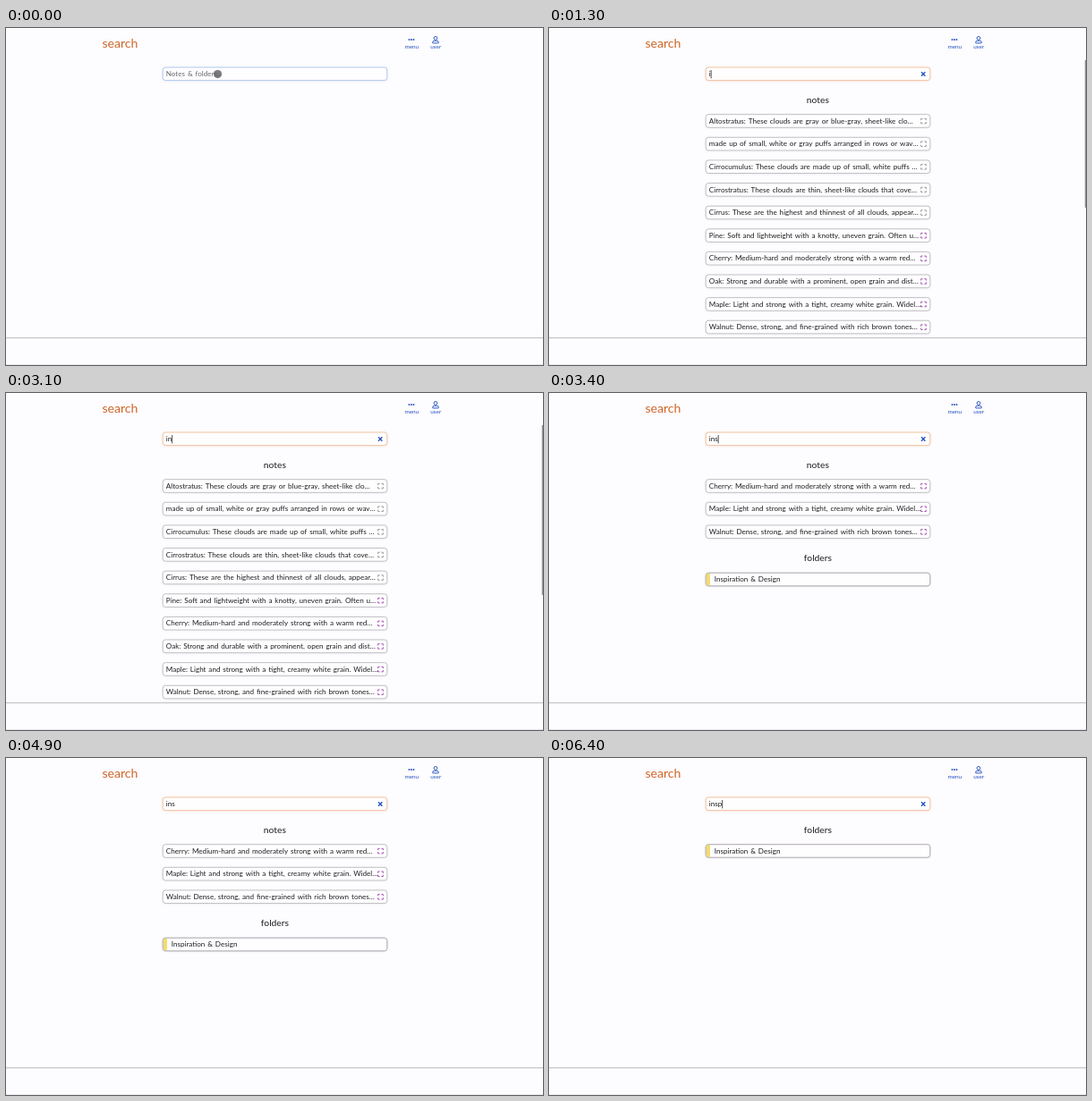
An HTML page with a canvas that plays this animation: 600x377 px, repeating every 6.6 s.

```html
<!DOCTYPE html>
<html lang="en">
<head>
<meta charset="utf-8">
<title>Note search</title>
<style>
  html, body { margin: 0; width: 100%; height: 100%; overflow: hidden; background: #fdfcff; }
  canvas { display: block; width: 600px; height: 377px; }
</style>
</head>
<body>
<canvas id="stage"></canvas>
<script>
const W = 600, H = 377, LOOP = 6600, BLINK = 500;
const FONT = 'Lato, "Open Sans", sans-serif';
const BLUE = '#2453bd', ORANGE = '#cf6526', GREY = '#929196', PURPLE = '#a04aae';
const LEFT = 175.2, WIDTH = 250.6, ROW_GAP = 25.62;

const canvas = document.getElementById('stage');
const ctx = canvas.getContext('2d');
const ratio = window.devicePixelRatio || 1;
canvas.width = W * ratio;
canvas.height = H * ratio;

const clouds = [
  'Altostratus: These clouds are gray or blue-gray, sheet-like clo…',
  'made up of small, white or gray puffs arranged in rows or wav…',
  'Cirrocumulus: These clouds are made up of small, white puffs …',
  'Cirrostratus: These clouds are thin, sheet-like clouds that cove…',
  'Cirrus: These are the highest and thinnest of all clouds, appear…'
].map(text => ({ text, color: GREY }));
const [pine, cherry, oak, maple, walnut] = [
  'Pine: Soft and lightweight with a knotty, uneven grain. Often u…',
  'Cherry: Medium-hard and moderately strong with a warm red…',
  'Oak: Strong and durable with a prominent, open grain and dist…',
  'Maple: Light and strong with a tight, creamy white grain. Widel…',
  'Walnut: Dense, strong, and fine-grained with rich brown tones…'
].map(text => ({ text, color: PURPLE }));
const all = [...clouds, pine, cherry, oak, maple, walnut];
const folders = ['Inspiration & Design'];

// Each state begins with a key press, which also restarts the caret blink.
const states = [
  { at: 0, query: '', idle: true },
  { at: 200, query: '' },
  { at: 1300, query: 'i', notes: all, scroll: 201 },
  { at: 2100, query: 'in', notes: all, scroll: 226 },
  { at: 3400, query: 'ins', notes: [cherry, maple, walnut], folders },
  { at: 5100, query: 'insp', folders }
];

function label(text, x, y, size = 8.1, color = '#1d1c20', align = 'left') {
  ctx.font = `${size}px ${FONT}`;
  ctx.wordSpacing = size < 9 ? '0.8px' : '0px';
  ctx.textAlign = align;
  ctx.fillStyle = color;
  ctx.fillText(text, x, y);
}

function line(points, color, width) {
  ctx.beginPath();
  points.forEach(([x, y], i) => i ? ctx.lineTo(x, y) : ctx.moveTo(x, y));
  ctx.strokeStyle = color;
  ctx.lineWidth = width;
  ctx.stroke();
}

function disc(x, y, r, color) {
  ctx.beginPath();
  ctx.arc(x, y, r, 0, Math.PI * 2);
  ctx.fillStyle = color;
  ctx.fill();
}

function box(cy, border, glow) {
  ctx.beginPath();
  ctx.roundRect(LEFT, cy - 7.3, WIDTH, 14.6, 3);
  ctx.save();
  ctx.shadowColor = glow;
  ctx.shadowBlur = 3 * ratio;
  ctx.shadowOffsetY = 0.5 * ratio;
  ctx.fillStyle = '#fffeff';
  ctx.fill();
  ctx.restore();
  ctx.strokeStyle = border;
  ctx.lineWidth = 0.9;
  ctx.stroke();
}

function expandIcon(x, y, color) {
  for (const sx of [-1, 1]) for (const sy of [-1, 1]) {
    const px = x + sx * 2.8, py = y + sy * 2.8;
    line([[px - sx * 1.9, py], [px, py], [px, py - sy * 1.9]], color, 0.95);
  }
}

function header() {
  label('search', 107.4, 21.5, 14.1, ORANGE);
  for (const dx of [-2.5, 0, 2.5]) disc(453 + dx, 13, 0.95, BLUE);
  label('menu', 453.3, 23.1, 6.4, BLUE, 'center');
  ctx.strokeStyle = BLUE;
  ctx.lineWidth = 0.95;
  ctx.beginPath();
  ctx.arc(480, 11.4, 1.9, 0, Math.PI * 2);
  ctx.stroke();
  ctx.beginPath();
  ctx.roundRect(476.6, 14.3, 6.8, 2.6, [2, 2, 0.6, 0.6]);
  ctx.stroke();
  label('user', 480.2, 23.1, 6.4, BLUE, 'center');
}

function footer() {
  line([[0, 346.7], [W, 346.7]], '#b9b8bd', 1);
  line([[0, 376.5], [W, 376.5]], '#e6e9f0', 1);
}

function field(state, time) {
  const { query, idle, at } = state;
  if (idle) box(51.3, '#a9c3ea', 'rgba(120,160,225,.22)');
  else box(51.3, '#f0bf98', 'rgba(235,150,85,.3)');
  label(query || 'Notes & folders..', 178.8, 54.2, 8.1, query ? '#1d1c20' : '#69686d');
  if (idle) {
    disc(236.5, 51.6, 4.6, 'rgba(95,93,98,.82)');
  } else if (Math.floor((time - at) / BLINK) % 2 === 0) {
    const x = 179.2 + (query ? ctx.measureText(query).width : 0);
    line([[x, 47], [x, 56.4]], '#222126', 0.8);
  }
  if (query) {
    line([[416, 49.3], [420.4, 53.7]], BLUE, 1.4);
    line([[416, 53.7], [420.4, 49.3]], BLUE, 1.4);
  }
}

function noteRow({ text, color }, cy) {
  box(cy, '#bbb9bf', 'rgba(100,95,110,.12)');
  label(text, 178.8, cy + 2.7);
  expandIcon(418.5, cy + 0.1, color);
}

function folderRow(name, cy) {
  box(cy, '#bbb9bf', 'rgba(100,95,110,.12)');
  ctx.beginPath();
  ctx.roundRect(LEFT + 0.2, cy - 7, 4.5, 14, [3, 0, 0, 3]);
  ctx.fillStyle = '#f3dc6b';
  ctx.fill();
  ctx.beginPath();
  ctx.roundRect(LEFT, cy - 7.3, WIDTH, 14.6, 3);
  ctx.strokeStyle = '#bbb9bf';
  ctx.stroke();
  label(name, 184.7, cy + 2.7);
}

function results({ notes = [], folders = [] }) {
  let y = 104;
  const section = (title, rows, draw) => {
    if (!rows.length) return;
    label(title, 300.4, y - 20.4, 10.3, '#1d1c20', 'center');
    for (const row of rows) {
      draw(row, y);
      y += ROW_GAP;
    }
    y += 27.7;
  };
  section('notes', notes, noteRow);
  section('folders', folders, folderRow);
}

function draw(time) {
  const state = states.findLast(s => s.at <= time);
  ctx.setTransform(ratio, 0, 0, ratio, 0, 0);
  ctx.fillStyle = '#fdfcff';
  ctx.fillRect(0, 0, W, H);
  header();
  field(state, time);
  results(state);
  footer();
  if (state.scroll) line([[599.4, 36], [599.4, state.scroll]], '#929196', 1.3);
}

const start = performance.now();
function tick() {
  draw((performance.now() - start) % LOOP);
  requestAnimationFrame(tick);
}
tick();
</script>
</body>
</html>
```
